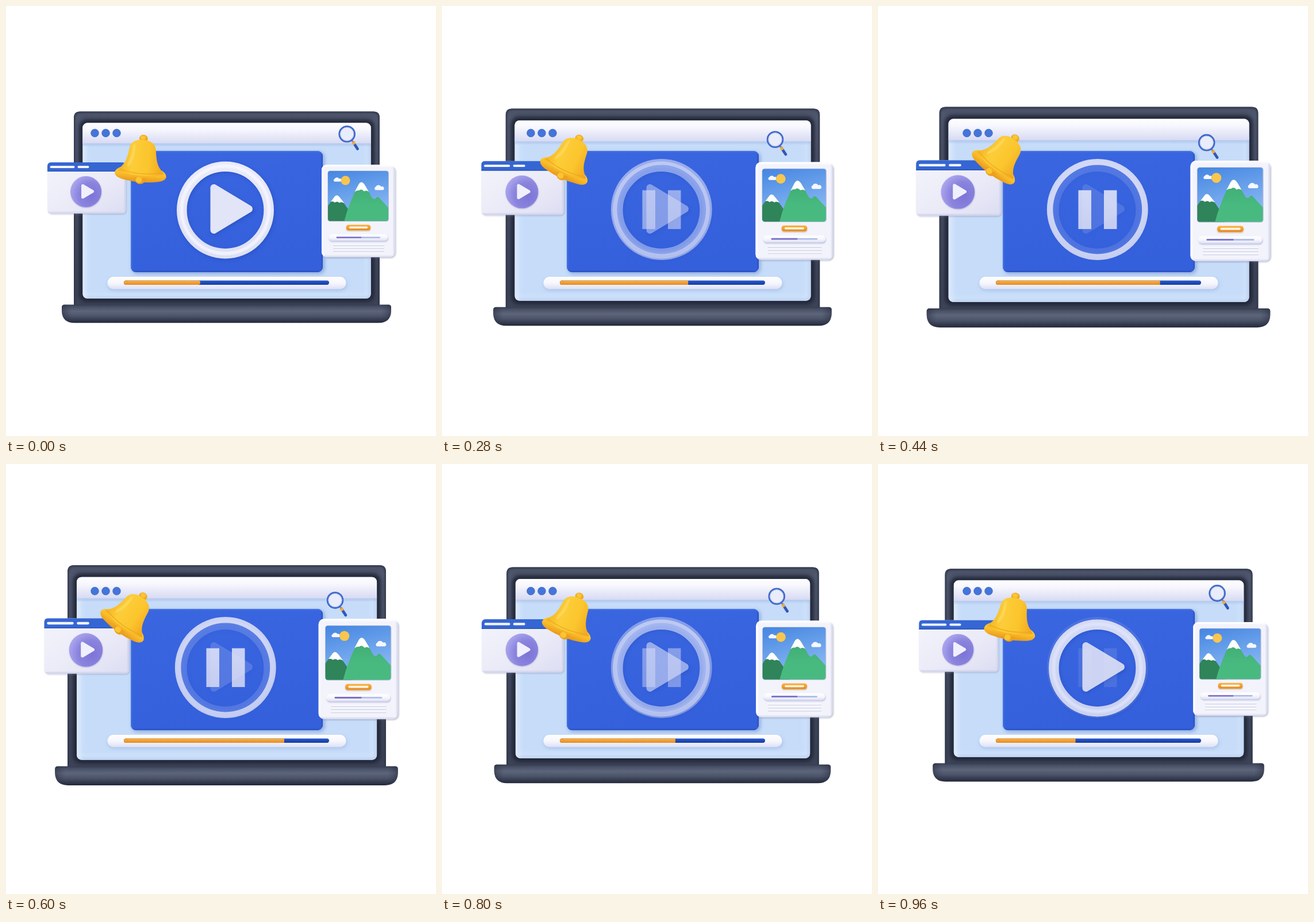
Write an HTML page that moves like this. It is 748 px wide and 748 px high and loops after 1000 ms.

```html
<!DOCTYPE html>
<html lang="en">
<head>
<meta charset="utf-8">
<title>Video player</title>
<style>
html, body { margin: 0; width: 100%; height: 100%; overflow: hidden; background: #fff; }
svg { display: block; width: 100%; height: 100%; }
</style>
</head>
<body>
<svg viewBox="0 0 748 748" xmlns="http://www.w3.org/2000/svg">
<defs>
  <linearGradient id="lidFill" x2="0" y2="1">
    <stop offset="0" stop-color="#4a5167"/><stop offset=".05" stop-color="#50586e"/><stop offset="1" stop-color="#3c4357"/>
  </linearGradient>
  <linearGradient id="baseFill" x2="0" y2="1">
    <stop offset="0" stop-color="#363d50"/><stop offset=".12" stop-color="#485066"/><stop offset=".36" stop-color="#5d657b"/>
    <stop offset=".62" stop-color="#4c546a"/><stop offset="1" stop-color="#23283a"/>
  </linearGradient>
  <linearGradient id="baseSide">
    <stop offset="0" stop-color="#1d2233" stop-opacity=".45"/><stop offset=".03" stop-color="#30364a" stop-opacity="0"/>
    <stop offset=".97" stop-color="#30364a" stop-opacity="0"/><stop offset="1" stop-color="#1d2233" stop-opacity=".45"/>
  </linearGradient>
  <linearGradient id="headFill" x2="0" y2="1">
    <stop offset="0" stop-color="#fff"/><stop offset=".35" stop-color="#f6f6fd"/><stop offset="1" stop-color="#d7daf3"/>
  </linearGradient>
  <linearGradient id="panelFill" x2=".25" y2="1">
    <stop offset="0" stop-color="#3a66e0"/><stop offset="1" stop-color="#3560dc"/>
  </linearGradient>
  <linearGradient id="pale" x2="1" y2="1">
    <stop offset="0" stop-color="#f4f4fc"/><stop offset=".55" stop-color="#ebebf8"/><stop offset="1" stop-color="#dcddf2"/>
  </linearGradient>
  <linearGradient id="iconFill" x2="0" y2="1">
    <stop offset="0" stop-color="#e9eafa"/><stop offset="1" stop-color="#dcdff5"/>
  </linearGradient>
  <linearGradient id="trackFill" x2="0" y2="1">
    <stop offset="0" stop-color="#fff"/><stop offset=".55" stop-color="#f5f5fd"/><stop offset="1" stop-color="#dde0f5"/>
  </linearGradient>
  <linearGradient id="gold" x2="0" y2="1">
    <stop offset="0" stop-color="#fbb440"/><stop offset=".5" stop-color="#f59e30"/><stop offset="1" stop-color="#e18a28"/>
  </linearGradient>
  <linearGradient id="rail" x2="0" y2="1">
    <stop offset="0" stop-color="#2b5ccc"/><stop offset=".5" stop-color="#1c4ab8"/><stop offset="1" stop-color="#183f9f"/>
  </linearGradient>
  <radialGradient id="violet" cx=".68" cy=".62" r=".75">
    <stop offset="0" stop-color="#7d74d6"/><stop offset=".55" stop-color="#8b84de"/><stop offset="1" stop-color="#b0abf0"/>
  </radialGradient>
  <linearGradient id="sky" x1=".1" x2=".4" y2="1">
    <stop offset="0" stop-color="#4787e2"/><stop offset="1" stop-color="#8ebcf4"/>
  </linearGradient>
  <linearGradient id="hill" x2="0" y2="1">
    <stop offset="0" stop-color="#3faa72"/><stop offset=".6" stop-color="#48ba80"/>
  </linearGradient>
  <linearGradient id="dome">
    <stop offset="0" stop-color="#f5b321"/><stop offset=".3" stop-color="#fccd38"/><stop offset=".65" stop-color="#fbc52d"/><stop offset="1" stop-color="#f1a51f"/>
  </linearGradient>
  <linearGradient id="lip" x2="0" y2="1">
    <stop offset="0" stop-color="#fdd245"/><stop offset=".5" stop-color="#f9bb2a"/><stop offset="1" stop-color="#e8961a"/>
  </linearGradient>
  <filter id="b1"><feGaussianBlur stdDeviation="1.2"/></filter>
  <filter id="b3" x="-20%" y="-20%" width="140%" height="140%"><feGaussianBlur stdDeviation="3"/></filter>
  <filter id="b5"><feGaussianBlur stdDeviation="5"/></filter>
  <clipPath id="lidClip"><path id="lidShape" d="M118 522V194.500Q118 183.500 129 183.500H639Q650 183.500 650 194.500V522Z"/></clipPath>
  <clipPath id="screenClip"><rect id="screen" x="133.400" y="203.600" width="501.300" height="305.200" rx="8"/></clipPath>
  <clipPath id="panelClip"><rect x="217" y="252" width="334" height="211" rx="9"/></clipPath>
  <clipPath id="miniClip"><rect x="72" y="272" width="136.500" height="89" rx="6"/></clipPath>
  <clipPath id="cardClip"><rect x="549" y="276" width="127.500" height="161" rx="9"/></clipPath>
  <clipPath id="photoClip"><rect x="560" y="287" width="105" height="87" rx="4"/></clipPath>
  <clipPath id="railClip"><rect x="205" y="477.500" width="357" height="7.500" rx="3.700"/></clipPath>
  <path id="baseShape" d="M97 524Q97 519.500 102 519.500H665Q670 519.500 670 524V531Q669 551.300 648 551.300H119Q98 551.300 97 531Z"/>
</defs>

<g id="laptop">
  <use href="#lidShape" fill="url(#lidFill)"/>
  <g clip-path="url(#lidClip)">
    <path d="M118 530V194.500Q118 183.500 129 183.500H639Q650 183.500 650 194.500V530" fill="none" stroke="#2e3446" stroke-width="5" filter="url(#b1)" opacity=".75"/>
    <rect x="131.500" y="201.500" width="505" height="309" rx="9" fill="none" stroke="#222737" stroke-width="9" filter="url(#b3)"/>
  </g>
  <use href="#screen" fill="#c6dcf9"/>
  <g clip-path="url(#screenClip)">
    <use href="#screen" fill="none" stroke="#e6f0fd" stroke-width="9" filter="url(#b5)"/>
    <path d="M634 235V508H140" fill="none" stroke="#a6c3ec" stroke-width="4" filter="url(#b3)"/>
    <rect x="130" y="232" width="510" height="10" fill="#a3bce4" filter="url(#b3)" opacity=".7"/>
    <rect x="133" y="203" width="502" height="36" fill="url(#headFill)"/>
  </g>
  <use href="#baseShape" fill="url(#baseFill)"/>
  <use href="#baseShape" fill="url(#baseSide)"/>
</g>

<g id="dots" fill="#4475d8" stroke="#3763c4" stroke-width=".6"></g>

<rect x="219" y="254" width="335" height="212" rx="9" fill="#6f8fd0" opacity=".65" filter="url(#b3)"/>
<rect x="217" y="252" width="334" height="211" rx="9" fill="url(#panelFill)"/>
<g clip-path="url(#panelClip)" fill="none" filter="url(#b1)">
  <path d="M551 252V463H217" stroke="#2a4fbd" stroke-width="4"/>
  <path d="M217 463V252H551" stroke="#5580e8" stroke-width="2.500"/>
</g>

<g id="play">
  <circle cx="383" cy="357" r="76" fill="none" stroke="#1f45ab" stroke-width="17" opacity=".5" filter="url(#b3)"/>
  <circle cx="381.500" cy="355" r="75.700" fill="none" stroke="url(#iconFill)" stroke-width="17.600"/>
  <circle cx="381.500" cy="354.500" r="76" fill="none" stroke="#fafaff" stroke-width="6" filter="url(#b1)" opacity=".7"/>
  <path d="M362 318V393L427 356Z" fill="#1f45ab" stroke="#1f45ab" stroke-width="10" stroke-linejoin="round" opacity=".5" filter="url(#b3)"/>
  <path d="M361.500 316V390L423 353Z" fill="#e2e4f7" stroke="#e2e4f7" stroke-width="12" stroke-linejoin="round"/>
</g>
<g id="pause" fill="url(#iconFill)">
  <circle cx="381.800" cy="354" r="82.700" fill="none" stroke="url(#iconFill)" stroke-width="10.500"/>
  <rect x="348.500" y="320.500" width="22.500" height="67.500"/>
  <rect x="393" y="320.500" width="22.500" height="67.500"/>
</g>

<rect x="177" y="474" width="416" height="21" rx="10.500" fill="#8eabdb" opacity=".5" filter="url(#b3)"/>
<rect x="176.500" y="471" width="415" height="21.500" rx="10.700" fill="url(#trackFill)"/>
<rect x="205" y="477.500" width="357" height="7.500" rx="3.700" fill="url(#rail)"/>
<g clip-path="url(#railClip)" fill="url(#gold)">
  <rect x="205" y="477.500" width="133" height="7.500" rx="3.700"/>
  <rect id="bar" x="205" y="477.500" height="7.500"/>
</g>
<circle cx="208.500" cy="481.200" r="3" fill="none" stroke="#e1952f" stroke-width=".8"/>

<g id="lens">
  <path d="M601 233L606 239.500" stroke="#8a93b5" stroke-width="3"/>
  <circle cx="593.200" cy="222.700" r="13.400" fill="#e9edfa" stroke="#4068cc" stroke-width="2.800"/>
  <circle cx="593.200" cy="222.700" r="11.500" fill="none" stroke="#b4c1ea" stroke-width="1"/>
  <path d="M604.300 237.500L611.500 248.500" stroke="#2f57be" stroke-width="4.800" stroke-linecap="round"/>
  <path d="M603.300 236L606.300 240.700" stroke="#f0aa3c" stroke-width="5"/>
</g>

<g id="mini">
  <rect x="73" y="274" width="137" height="89" rx="7" fill="#7d86a8" opacity=".32" filter="url(#b1)"/>
  <g clip-path="url(#miniClip)">
    <rect x="72" y="272" width="137" height="89" fill="url(#pale)"/>
    <path d="M207.500 285V360H72" fill="none" stroke="#cfd1ea" stroke-width="3" filter="url(#b1)"/>
    <path d="M74 288V357" stroke="#fff" stroke-width="3" filter="url(#b1)"/>
    <rect x="72" y="272" width="137" height="16" fill="#3566d3"/>
    <path d="M72 287.500H209" stroke="#2750b0" stroke-width="1.200"/>
  </g>
  <path d="M78.500 280H117.500M126.500 280H142.500" stroke="#f3f4fd" stroke-width="4" stroke-linecap="round"/>
  <circle cx="139.500" cy="324" r="27" fill="#8079c4" opacity=".5" filter="url(#b1)"/>
  <circle cx="139" cy="323" r="27" fill="url(#violet)"/>
  <path d="M133.500 312.500V332.500L150.500 322.500Z" fill="#f0effc" stroke="#f0effc" stroke-width="5" stroke-linejoin="round"/>
</g>

<g id="card">
  <rect x="551" y="279" width="127.500" height="160" rx="9" fill="#6f7899" opacity=".38" filter="url(#b1)"/>
  <rect x="549" y="276" width="127.500" height="161" rx="9" fill="#f3f3fc"/>
  <g clip-path="url(#cardClip)" fill="none">
    <path d="M676 280V436.500H549" stroke="#d6d8ee" stroke-width="3.500" filter="url(#b1)"/>
    <path d="M550 436V277H677" stroke="#fff" stroke-width="4" filter="url(#b1)"/>
  </g>
  <rect x="559.500" y="286.500" width="106.500" height="88.500" rx="4.500" fill="#b8bdd8"/>
  <g clip-path="url(#photoClip)">
    <rect x="560" y="287" width="105" height="87" fill="url(#sky)"/>
    <g fill="#f6f8ff">
      <path id="cloud" d="M571.500 305.500A2.500 2.500 0 0 1 571.500 300.800A4.600 4.600 0 0 1 579.500 300.500A2.600 2.600 0 0 1 582 305.500Z"/>
      <use href="#cloud" transform="translate(648.500 316) scale(1.200) translate(-576 -302)"/>
    </g>
    <circle cx="590.500" cy="303.500" r="8" fill="#f8c64d"/>
    <path d="M556 353L570.500 333Q575 326 580 332L604 366V376H556Z" fill="#2f8459"/>
    <path d="M565 340.500L570.500 333Q575 326 580 332L588.500 343Q583 340 580 342.500Q576 339 572 342Q569 339 565 340.500Z" fill="#fff"/>
    <path d="M588 376Q595 346 613 311Q618 302 624 311L637 334Q641 338 644 333.500Q647 330 650 334.500L668 354V376Z" fill="url(#hill)"/>
    <path d="M606.500 323.500L613 311Q618 302 624 311L631 323Q627 320 623 322.500Q618 317 614 321Q610 320 606.500 323.500Z" fill="#fff"/>
  </g>
  <rect x="592" y="382" width="42" height="9.500" rx="4" fill="#c08a3a" opacity=".6" filter="url(#b1)"/>
  <rect x="592" y="380.500" width="42" height="9.500" rx="4" fill="url(#gold)"/>
  <path d="M598.500 385.200H627.500" stroke="#fdf4e4" stroke-width="3.400" stroke-linecap="round"/>
  <rect x="562" y="399" width="103" height="11.500" rx="5.700" fill="#9ba2c8" opacity=".55" filter="url(#b1)"/>
  <rect x="561.500" y="397" width="102.500" height="11.500" rx="5.700" fill="url(#trackFill)"/>
  <path d="M576 402.700H650" stroke="#a9b9e4" stroke-width="2.400" stroke-linecap="round"/>
  <path d="M576 402.700H617" stroke="#7b70c8" stroke-width="2.600" stroke-linecap="round"/>
  <path d="M570 416.500H657M570 421.500H657M570 426.500H657" stroke="#d5d8ea" stroke-width="1.800" stroke-linecap="round"/>
  <path d="M570 415.300H657M570 420.300H657M570 425.300H657" stroke="#fff" stroke-width="1"/>
</g>

<g id="bell">
  <ellipse cy="1.500" rx="7.500" ry="6.500" fill="#f0ab22"/>
  <ellipse cx="-1" cy="0" rx="4.500" ry="3.500" fill="#fbc637"/>
  <path d="M-33 53Q-45 58 -45 65Q-44 72 -32 74.500Q0 81 32 74.500Q44 72 45 65Q45 58 33 53Z" fill="url(#lip)"/>
  <path d="M-10 70Q-9 81 0 81Q9 81 10 70Q0 73 -10 70Z" fill="#eca11c"/>
  <ellipse cx="-2" cy="74" rx="5.500" ry="5" fill="#fbc433"/>
  <path d="M0 4C13 4 21 9 23 19C25 35 27 46 36 55Q40 58 40 61Q0 72 -40 61Q-40 58 -36 55C-27 46 -25 35 -23 19C-21 9 -13 4 0 4Z" fill="url(#dome)"/>
  <path d="M-36 58Q0 68 36 58" fill="none" stroke="#e9a31f" stroke-width="1.500" opacity=".75"/>
  <path d="M-14 15Q-15 37 -23 50" fill="none" stroke="#fee27a" stroke-width="5" stroke-linecap="round" opacity=".5" filter="url(#b1)"/>
</g>
</svg>
<script>
const $ = id => document.getElementById(id);
const LOOP = 1000, STEP = 40, HALF = 511.5;

$("dots").innerHTML = [154.5, 173.5, 192.5]
  .map(x => `<circle cx="${x}" cy="221" r="6.900"/>`).join("");

const zoom = (id, cx, cy, k) =>
  $(id).setAttribute("transform", `translate(${cx} ${cy}) scale(${k}) translate(${-cx} ${-cy})`);

function draw(time) {
  const t = Math.floor((time % LOOP) / STEP) * STEP;
  const u = Math.min(t, 2 * HALF - t) / HALF;   // triangle wave

  zoom("laptop", 383.7, 367, 1 + 0.05 * u);
  zoom("mini", 140.5, 316.7, 1 + 0.1 * u);
  zoom("card", 613, 356.5, 1 + 0.1 * u);
  $("lens").setAttribute("transform", `translate(${-25 * u} ${17.4 * u})`);
  $("bell").setAttribute("transform", `translate(239.5 229) rotate(${5 + 37 * u})`);
  $("play").setAttribute("opacity", 1 - u);
  $("pause").setAttribute("opacity", u);
  $("bar").setAttribute("width", 114 + 199.5 * u);
}

function tick(now) {
  draw(now);
  requestAnimationFrame(tick);
}
draw(0);
requestAnimationFrame(tick);
</script>
</body>
</html>
```
